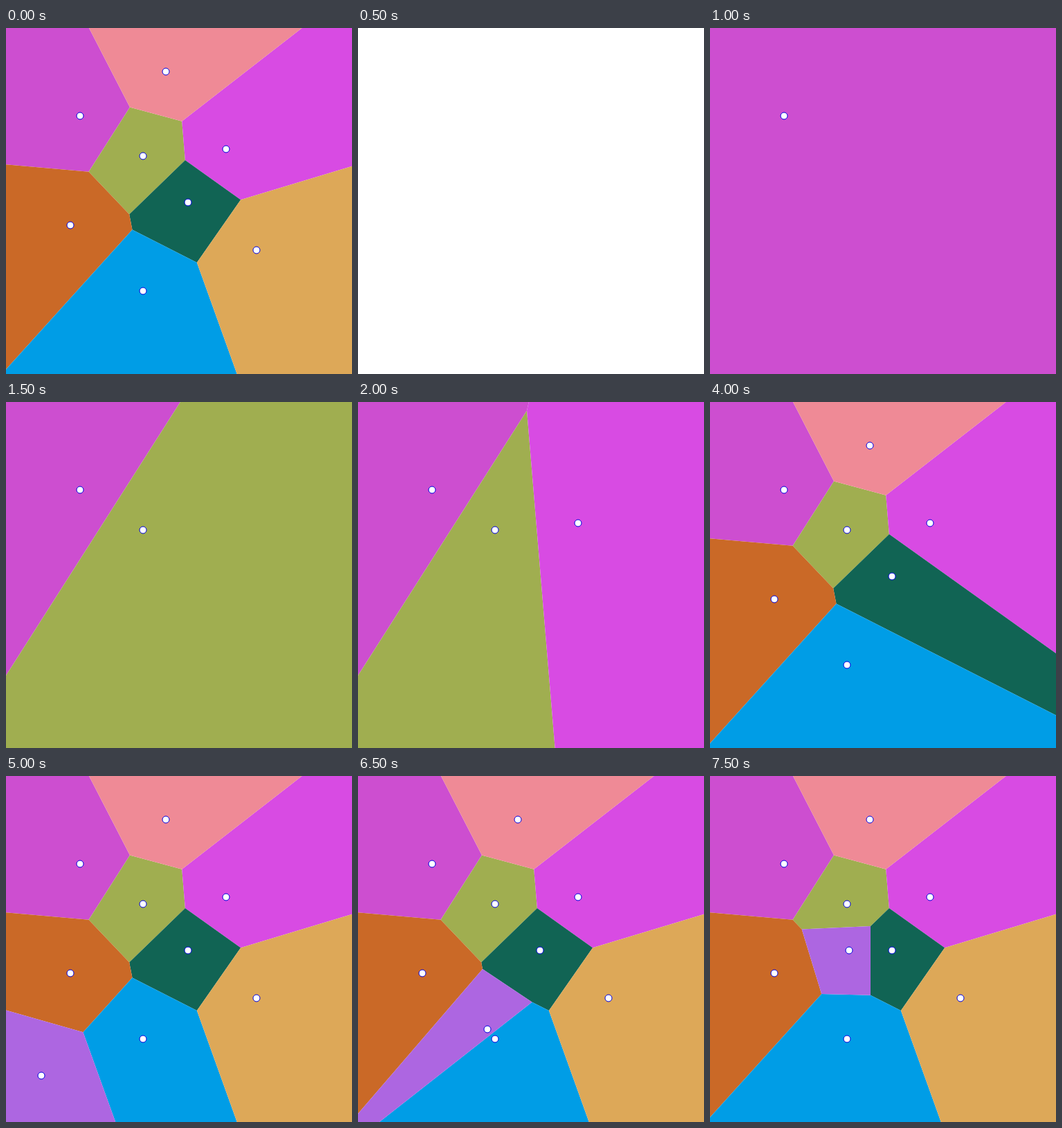
Recreate the animation shown at these times as an HTML page with a canvas. Size 500 by 500 pixels, loop 8 s.

```html
<!DOCTYPE html>
<html>
<head>
<meta charset="utf-8">
<style>
html, body { margin: 0; width: 100%; height: 100%; overflow: hidden; background: #fff; }
canvas { display: block; }
</style>
</head>
<body>
<canvas id="stage" width="500" height="500"></canvas>
<script>
const SIZE = 500, STEP = 500, LOOP = 8000;
const ctx = document.getElementById("stage").getContext("2d");

// Sites in order of insertion
const sites = [
  { x: 107, y: 127, color: "#cd4ed0" },
  { x: 198, y: 185, color: "#a0ae50" },
  { x: 318, y: 175, color: "#d84be3" },
  { x: 231, y: 63, color: "#ef8a96" },
  { x: 263, y: 252, color: "#116454" },
  { x: 93, y: 285, color: "#ca6927" },
  { x: 198, y: 380, color: "#009de6" },
  { x: 362, y: 321, color: "#dda858" }
];

// Successive places of the ninth site
const stops = [[51, 433], [110, 366], [112, 383], [187, 366], [187, 362], [201, 252]];

function sitesAt(step) {
  if (step === 0) return sites;
  const count = step - 1;
  if (count <= sites.length) return sites.slice(0, count);
  const [x, y] = stops[Math.min(count - sites.length - 1, stops.length - 1)];
  return [...sites, { x, y, color: "#ad66e1" }];
}

// Keep the part of a polygon that is nearer to a than to b
function clip(poly, a, b) {
  const nx = b.x - a.x, ny = b.y - a.y;
  const mx = (a.x + b.x) / 2, my = (a.y + b.y) / 2;
  const side = p => (p.x - mx) * nx + (p.y - my) * ny;
  const out = [];
  poly.forEach((p, i) => {
    const q = poly[(i + 1) % poly.length];
    const sp = side(p), sq = side(q);
    if (sp <= 0) out.push(p);
    if (sp * sq < 0) {
      const k = sp / (sp - sq);
      out.push({ x: p.x + (q.x - p.x) * k, y: p.y + (q.y - p.y) * k });
    }
  });
  return out;
}

function cell(site, all) {
  let poly = [{ x: 0, y: 0 }, { x: SIZE, y: 0 }, { x: SIZE, y: SIZE }, { x: 0, y: SIZE }];
  for (const other of all) {
    if (other !== site) poly = clip(poly, site, other);
  }
  return poly;
}

function draw(step) {
  const all = sitesAt(step);
  ctx.fillStyle = "#fff";
  ctx.fillRect(0, 0, SIZE, SIZE);
  for (const s of all) {
    ctx.beginPath();
    cell(s, all).forEach(p => ctx.lineTo(p.x, p.y));
    ctx.closePath();
    ctx.fillStyle = s.color;
    ctx.fill();
  }
  ctx.fillStyle = "#fff";
  ctx.strokeStyle = "#0000e0";
  ctx.lineWidth = 1;
  for (const s of all) {
    ctx.beginPath();
    ctx.arc(s.x, s.y, 5, 0, Math.PI * 2);
    ctx.fill();
    ctx.stroke();
  }
}

const start = performance.now();
function tick() {
  const time = Math.max(0, performance.now() - start) % LOOP;
  draw(Math.floor(time / STEP));
  requestAnimationFrame(tick);
}
tick();
</script>
</body>
</html>
```
